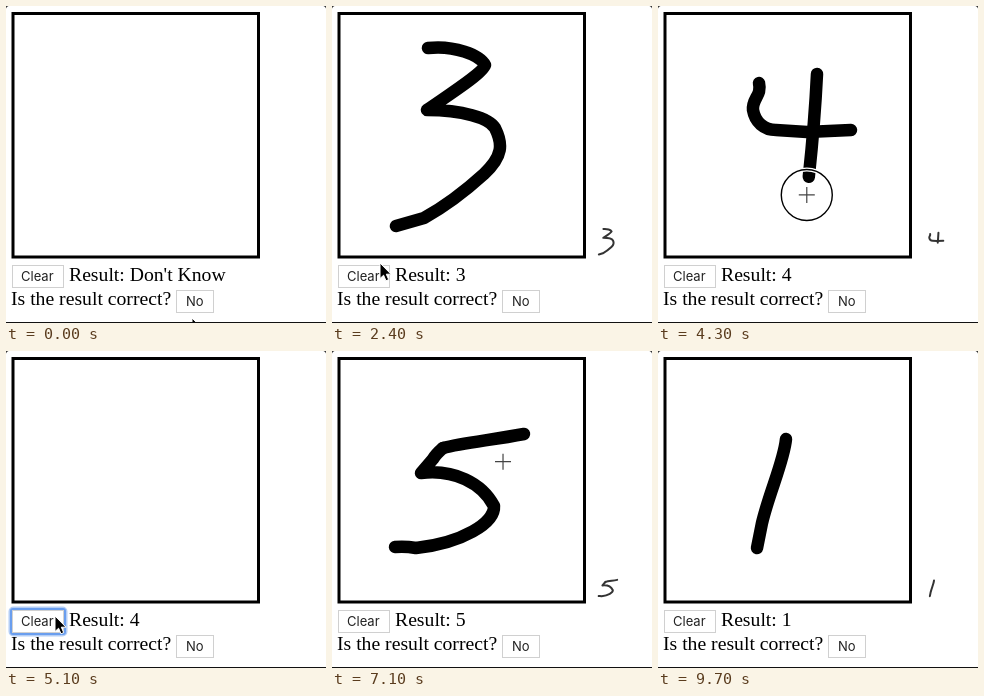
An HTML page that plays this animation: 320 px wide and 317 px high, repeating every 9.8 s.

```html
<!DOCTYPE html>
<html lang="en">
<head>
<meta charset="utf-8">
<title>Digit recognition</title>
<style>
  html, body { margin: 0; width: 100%; height: 100%; overflow: hidden; background: #fff; }
  svg { display: block; width: 320px; height: 317px; }
  text { font: 19.7px "Liberation Serif", "Times New Roman", serif; }
  .label { font: 13px Inter, sans-serif; fill: #222; }
  .button { fill: #fff; stroke: #d0d0d0; }
  .ink { fill: none; stroke: #000; stroke-width: 12.5; stroke-linecap: round; stroke-linejoin: round; }
  .thumb .ink { stroke: #333; stroke-width: 14; }
</style>
</head>
<body>
<svg viewBox="0 0 320 317">
  <path d="M0 2.5V0H2.5Q.5 .5 0 2.5M320 2.5V0H317.5Q319.5 .5 320 2.5" fill="#333"/>
  <rect x="7" y="7.5" width="245.5" height="243.5" fill="#fff" stroke="#000" stroke-width="3"/>
  <g id="drawing"></g>
  <g id="thumb" class="thumb" transform="translate(257.7 217) scale(.143)"></g>

  <g id="ring" fill="none" stroke="#6a9eee">
    <rect x="4.5" y="257.5" width="55" height="26" rx="3" stroke-width="4" stroke-opacity=".5"/>
    <rect x="5" y="258" width="54" height="25" rx="2" stroke-width="2"/>
  </g>
  <rect class="button" x="6.5" y="259.5" width="51" height="22"/>
  <text class="label" x="15" y="275">Clear</text>
  <text id="result" x="63" y="275"></text>
  <text x="5" y="299.4">Is the result correct?</text>
  <rect class="button" x="170.5" y="284.5" width="37" height="22"/>
  <text class="label" x="180" y="300">No</text>

  <g id="pointer">
    <g id="press" fill="none">
      <circle r="25.5" stroke="#fff" stroke-width="4"/>
      <circle r="25.5" stroke="#000" stroke-width="1.4"/>
    </g>
    <path id="cross" d="M-8 0H8M0-8V8" stroke="#444" stroke-width="1.2"/>
    <path id="arrow" d="M0 0V15.5L3.6 12.2 6 17.8 8.7 16.6 6.3 11.2H11Z" stroke="#fff" stroke-width="1"/>
  </g>
  <path d="M0 316.5H320" stroke="#111"/>
</svg>
<script>
const LOOP = 9800, STEP = 100, INK_LAG = 60, THUMB_STEP = 300, HOLD = 100;
const $ = id => document.getElementById(id);
const clamp = v => Math.max(0, Math.min(1, v));

// start, end, time of clearing, path
const strokes = [
  [1000, 2000, 2600, "M96 42C122 39 148 49 153 59C151 67 118 88 95 104C130 104 157 112 163 122C171 138 171 150 152 168C130 188 110 202 92 212Q78 216 64 220"],
  [3100, 3600, 5000, "M101 77C104 90 94 92 95 104C97 116 106 124 118 124L149 126 193 124"],
  [3900, 4350, 5000, "M159 68Q156 130 147 204"],
  [5400, 5900, 8000, "M111 97Q104 103 101 108L89 122C122 118 150 132 162 155C163 172 130 192 84 197Q73 195 63 196"],
  [6500, 6840, 8000, "M111 97C130 92 160 89 192 83"],
  [8500, 8940, LOOP, "M128 88C126 110 111 142 104 172L99 197"]
].map(([start, end, clear, d]) => {
  const add = parent => {
    const path = document.createElementNS("http://www.w3.org/2000/svg", "path");
    path.setAttribute("d", d);
    path.setAttribute("class", "ink");
    return parent.appendChild(path);
  };
  const path = add($("drawing")), mini = add($("thumb"));
  const length = path.getTotalLength();
  const at = p => {
    const { x, y } = path.getPointAtLength(p * length);
    return [x, y];
  };
  return { start, end, clear, path, mini, length, at };
});

const clicks = [2600, 5000, 8000];
const results = [[0, "Don't Know"], [1400, "3"], [3400, "4"], [5800, "5"], [9000, "1"]];

// pointer rests: time, x, y
const rests = [
  [0, 186, 312], [800, 96, 40], [2400, 48, 257], [2600, 50, 264], [2700, 50, 264],
  [4900, 46, 270], [5000, 47, 270], [5100, 49, 265], [6100, 63, 184],
  [7900, 53, 266], [8000, 52, 268], [8100, 52, 264], [9200, 94, 194], [9300, 94, 194], [9700, 148, 320]
];
for (const s of strokes) rests.push([s.start, ...s.at(0)], [s.end, ...s.at(1)]);
rests.sort((a, b) => a[0] - b[0]);

function pointerAt(t) {
  const s = strokes.find(s => t >= s.start && t <= s.end);
  if (s) return s.at((t - s.start) / (s.end - s.start));
  const i = rests.findIndex(r => r[0] > t);
  if (i < 0) return rests.at(-1).slice(1);
  const [t0, x0, y0] = rests[i - 1], [t1, x1, y1] = rests[i];
  const p = (t - t0) / (t1 - t0), e = p * p * (3 - 2 * p);
  return [x0 + (x1 - x0) * e, y0 + (y1 - y0) * e];
}

function show(el, on) {
  el.style.display = on ? "" : "none";
}

function trace(path, s, t, now) {
  const p = clamp((t - INK_LAG - s.start) / (s.end - s.start));
  show(path, t >= s.start && now < s.clear);
  path.style.strokeDasharray = p < 1 ? `${p * s.length + 0.01} 2000` : "none";
}

function draw(t) {
  for (const s of strokes) {
    trace(s.path, s, t, t);
    trace(s.mini, s, Math.floor(t / THUMB_STEP) * THUMB_STEP, t);
  }
  $("result").textContent = "Result: " + results.findLast(r => r[0] <= t)[1];
  show($("ring"), clicks.some(c => t >= c && t < strokes.find(s => s.start > c).start));

  const [x, y] = pointerAt(t);
  const inside = x > 6 && x < 253 && y > 6 && y < 252;
  $("pointer").setAttribute("transform", `translate(${x} ${y})`);
  show($("cross"), inside);
  show($("arrow"), !inside);
  show($("press"), clicks.some(c => t >= c && t < c + STEP)
    || strokes.some(s => t >= s.start && t <= s.end + HOLD)
    || t > 8900 && t < 9400);
}

const begin = performance.now();
function tick() {
  const t = (performance.now() - begin) % LOOP;
  draw(Math.floor(t / STEP) * STEP);
  requestAnimationFrame(tick);
}
tick();
</script>
</body>
</html>
```
